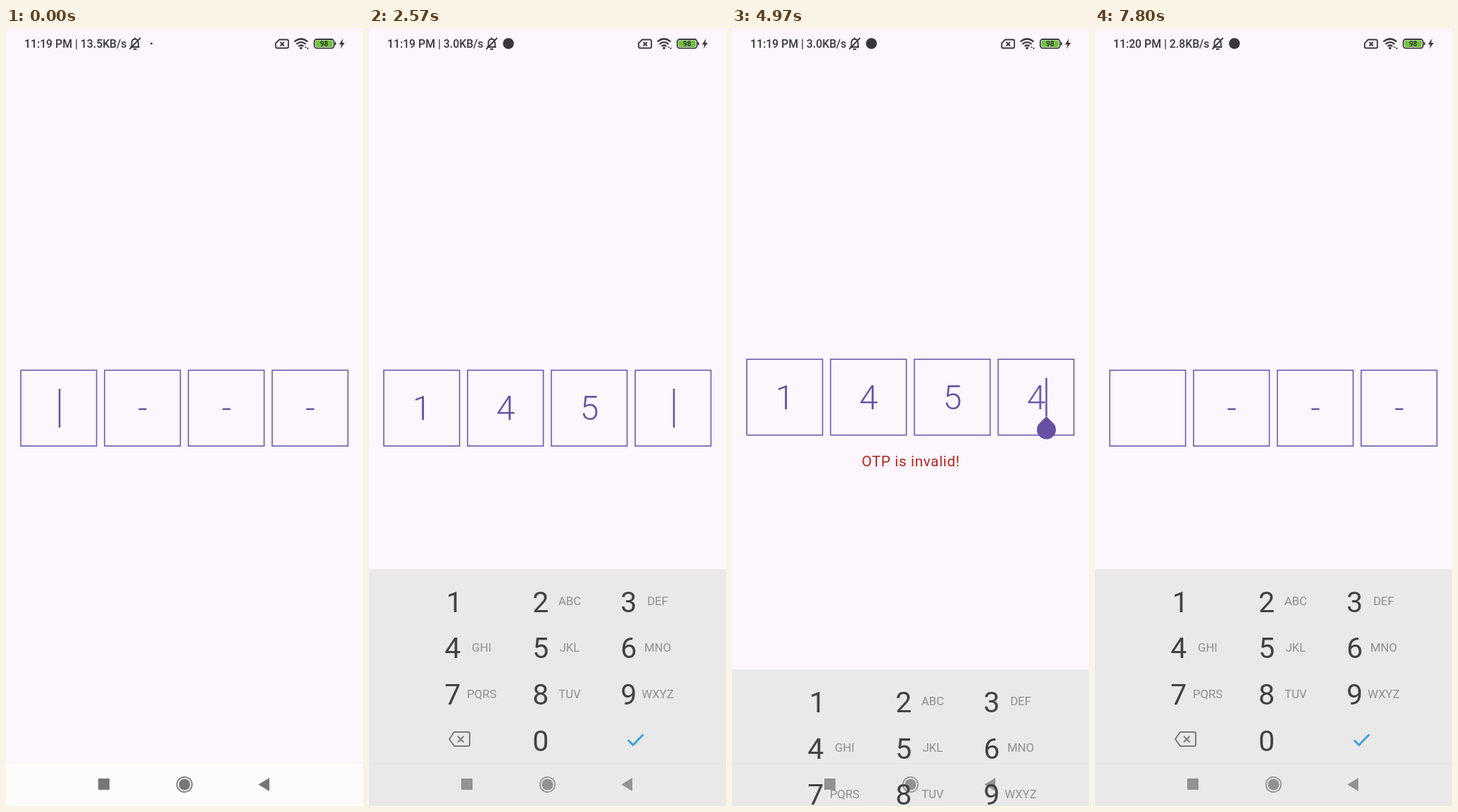
An HTML page for the animation above (8000 ms loop, 507x1104 px).

```html
<!DOCTYPE html>
<html lang="en">
<head>
<meta charset="utf-8">
<title>Code entry</title>
<style>
html, body { margin: 0; width: 100%; height: 100%; overflow: hidden; background: #fdf6fc; }
svg { display: block; width: 507px; height: 1104px; font-family: Roboto, sans-serif; }
.mid { text-anchor: middle; }
.line { fill: none; stroke-width: 1.8; }
.ink { stroke: #39363d; }
.box { fill: none; stroke: #6e5aae; stroke-width: 1.6; }
.code { font-size: 48px; font-weight: 300; fill: #6750a4; }
.key { font-size: 41px; fill: #424244; }
.sub { font-size: 16.7px; fill: #8f8f8f; }
</style>
</head>
<body>
<svg viewBox="0 0 507 1104">
  <rect width="507" height="1104" fill="#fdf6fc"/>
  <rect y="1043" width="507" height="61" fill="#fcfcfa"/>

  <g fill="#39363d">
    <text id="status" x="26" y="28" font-size="15.8" font-weight="500"></text>
    <g id="bell" class="line ink">
      <path d="M176.500 27h13M178.500 26.500v-5q0-5.500 4.700-6q4.700 .5 4.700 6v5M183.200 13.500v2M181 30h4.500M175.500 30L191 14"/>
    </g>
    <circle id="notice" cy="22"/>
    <path class="line ink" d="M388 16.500h11q2 0 2 2v8q0 2-2 2h-14q-2 0-2-2v-5zM389.500 20l5.500 5.500m0-5.500l-5.500 5.500"/>
    <path class="line ink" style="stroke-width:2.200" d="M409.500 19.500q9.500-8 19 0M412.500 22.800q6.500-5.500 13 0M415.500 26q3.500-3 7 0"/>
    <circle cx="419" cy="28.500" r="1.800"/>
    <path d="M424 28l1.500-2 1.500 2zM427 28h3l-1.500 2.500z"/>
    <rect x="439.500" y="17.500" width="24.500" height="9.500" rx="2" fill="#6fc23c"/>
    <rect class="line ink" x="437.800" y="16" width="28" height="12.600" rx="3.500"/>
    <path d="M467 20q2 0 2 2.300t-2 2.300zM478.500 15l-5.500 8.500h3.500l-1.500 6 6-8.500h-3.500z"/>
    <text class="mid" x="451.700" y="26" font-size="10" font-weight="700">98</text>
  </g>

  <g id="form">
    <g id="boxes"></g>
    <rect id="cursor" y="512" width="2.500" height="55" fill="#6750a4"/>
    <path id="handle" fill="#6750a4" d="M446.500 566.500L456 576A13.500 13.500 0 1 1 437 576Z"/>
  </g>
  <text id="error" class="mid" x="254" y="622" font-size="20.7" letter-spacing=".65" fill="#b3261e">OTP is invalid!</text>

  <rect id="panel" y="768" width="507" height="336" fill="#e8e9e8"/>
  <path d="M0 1043.500h507" stroke="#000" stroke-opacity=".025"/>
  <g id="nav">
    <rect x="131" y="1065" width="16" height="16" stroke="none"/>
    <circle cx="253.500" cy="1073.500" r="8" stroke="none"/>
    <circle cx="253.500" cy="1073.500" r="10.700" fill="none" stroke-width="1.700"/>
    <path d="M358.500 1073.500l15.500-9.500v19z" stroke="none"/>
  </g>
  <g id="keys">
    <g id="labels"></g>
    <path class="line" stroke="#7b7b7b" style="stroke-width:2" d="M121 999h20q2 0 2 2v16q0 2-2 2h-20l-7-10zM126 1005l8.500 8.500m0-8.500l-8.500 8.500"/>
    <path class="line" stroke="#3ba0d8" style="stroke-width:2.800" d="M368 1010.500l7 7L389.500 1002.500"/>
  </g>
  <circle id="touch" r="15" fill="#fff" fill-opacity=".55" stroke="#b9b9de" stroke-opacity=".7"/>
</svg>
<script>
const $ = id => document.getElementById(id);
const set = (id, attrs) => { for (const k in attrs) $(id).setAttribute(k, attrs[k]); };
const show = (id, on) => { $(id).style.display = on ? '' : 'none'; };
const LOOP = 8000, PANEL = 336;
const centers = [0, 1, 2, 3].map(i => 75 + 119 * i);

$('boxes').innerHTML = centers.map((c, i) =>
  `<rect class="box" x="${c - 54}" y="485.600" width="107.600" height="107.600"/>
   <text class="code mid" id="d${i}" x="${c}" y="556"></text>`).join('');

$('labels').innerHTML = ['', 'ABC', 'DEF', 'GHI', 'JKL', 'MNO', 'PQRS', 'TUV', 'WXYZ', '', '']
  .map((sub, i) => {
    if (i === 9) return '';
    const x = 118.7 + i % 3 * 125, y = 828.6 + Math.floor(i / 3) * 65.7;
    const nudge = i ? 0 : 2.5; // the narrow 1 is centred by its shape
    return `<text class="key mid" x="${x + nudge}" y="${y}">${(i + 1) % 11}</text>
      <text class="sub mid" x="${x + 41.3}" y="${y - 9.5}">${sub}</text>`;
  }).join('');

// [time, entered code, focused box]; each one restarts the cursor blink
const states = [
  [0, '', 0], [30, '', 0],
  [1100, '1', -1], [1200, '1', 1],
  [1760, '14', -1], [1850, '14', 2],
  [2240, '145', -1], [2300, '145', 3],
  [2850, '1454', -1], [4800, '1454', 3],
  [5950, '145', 3], [6060, '145', 2],
  [6400, '14', 2], [6510, '14', 1],
  [6850, '1', 1], [6960, '1', 0], [7300, '', 0]
];

// [x, y, down, up]
const FADE = 200;
const touches = [
  [126, 820, 1040, 1230], [128, 883, 1700, 1850], [282, 898, 2200, 2370],
  [136, 884, 2800, 2880], [434, 526, 4670, 4790],
  [144, 1010, 5870, 6020], [143, 1010, 6320, 6440],
  [143, 1011, 6770, 6890], [143, 1010, 7130, 7230]
];

const clamp = v => Math.min(1, Math.max(0, v));

// cubic-bezier(.4, 0, .2, 1)
function ease(p) {
  let lo = 0, hi = 1, u;
  for (let i = 0; i < 24; i++) {
    u = (lo + hi) / 2;
    const v = 1 - u;
    if (1.2 * v * v * u + 0.6 * v * u * u + u ** 3 < p) lo = u; else hi = u;
  }
  return u * u * (3 - 2 * u);
}
const slide = (t, start, length) => ease(clamp((t - start) / length));

function draw(t) {
  const [since, code, focus] = states.findLast(s => s[0] <= t);
  const invalid = t >= 2870 && t < 5950;
  centers.forEach((c, i) => {
    $('d' + i).textContent = code[i] || (i === focus ? '' : '-');
  });
  set('form', { transform: `translate(0 ${invalid ? -15.5 : 0})` });
  show('error', invalid);
  show('handle', t >= 4800 && t < 5950);
  show('cursor', focus >= 0 && Math.floor((t - since) / 500) % 2 === 0);
  if (focus >= 0) set('cursor', { x: centers[focus] + (code[focus] ? 13.2 : -0.2) });

  const open = slide(t, 211, 400) - slide(t, 2880, 285) + slide(t, 4818, 400);
  const shift = `translate(0 ${PANEL * (1 - open)})`;
  set('panel', { transform: shift });
  set('keys', { transform: shift });
  const grey = 118 + 28 * clamp((t - 400) / 430);
  const tone = `rgb(${grey},${grey},${grey})`;
  set('nav', { fill: tone, stroke: tone });

  const early = t < 2400, late = t >= 6600;
  $('status').textContent = `11:${late ? 20 : 19} PM | ${early ? '13.5' : late ? '2.8' : '3.0'}KB/s`;
  set('bell', { transform: `translate(${early ? 0 : -9} 0)` });
  set('notice', { cx: early ? 206.5 : 198, r: early ? 1.5 : 7.8 });

  const tap = touches.find(p => t >= p[2] && t < p[3] + FADE);
  show('touch', tap);
  if (tap) set('touch', { cx: tap[0], cy: tap[1], opacity: 1 - clamp((t - tap[3]) / FADE) });
}

const begin = performance.now();
function tick() {
  draw((performance.now() - begin) % LOOP);
  requestAnimationFrame(tick);
}
tick();
</script>
</body>
</html>
```
